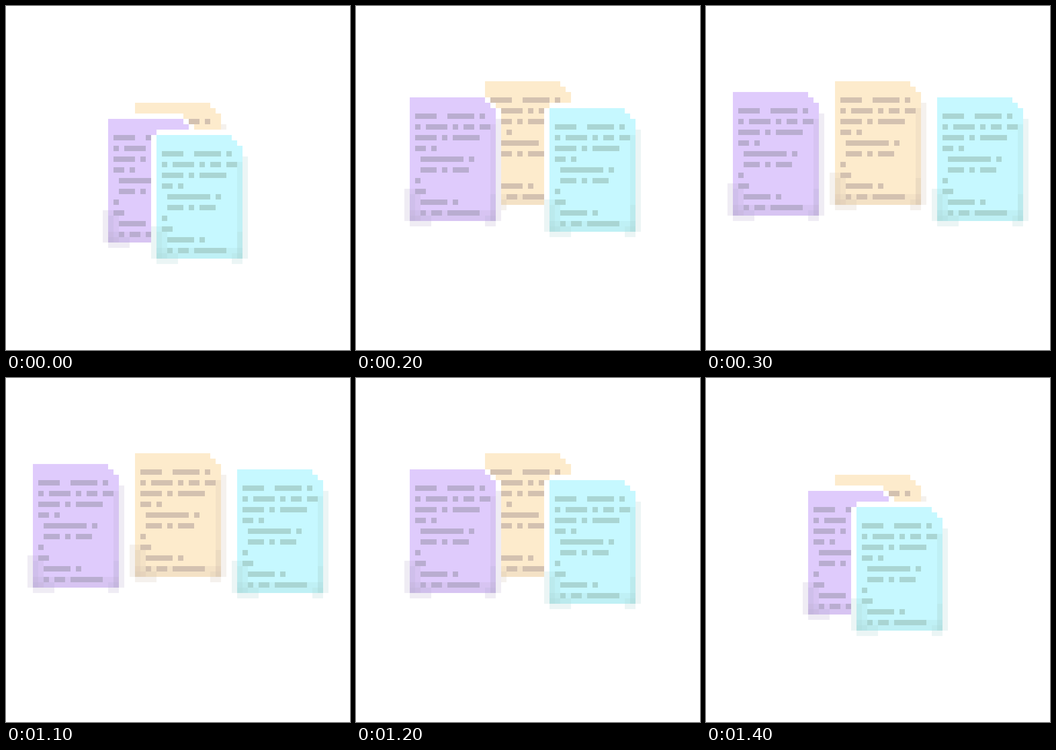
Animation of 640x640 px, one loop 1500 ms. Source, as an HTML page with a canvas:

```html
<!DOCTYPE html>
<html>
<head>
<meta charset="utf-8">
<style>
html, body { margin: 0; width: 100%; height: 100%; overflow: hidden; background: #fff; }
canvas { display: block; width: 640px; height: 640px; }
</style>
</head>
<body>
<canvas id="stage" width="640" height="640"></canvas>
<script>
const ctx = document.getElementById('stage').getContext('2d');
const CELL = 10, W = 16, H = 23;

// Every second row of a page, starting at row 3
const lines = [
  ' ####  ##### #',
  ' # #### # ## ##',
  ' #### # #####',
  ' ## #',
  '  ######## #',
  '  ### # ###',
  ' #',
  ' ##',
  '  ##### #',
  '  # ## ######'
];

// Back to front; x and y in cells at the key steps, from stacked to spread out
const keySteps = [0, 2, 3, 4];
const pages = [
  { paper: '#fdebcc', ink: '#d3c1b0', x: [24, 24, 24, 24], y: [18, 14, 14, 16] },
  { paper: '#dfcbfc', ink: '#b9add0', x: [19, 10, 5, 4], y: [21, 17, 16, 12] },
  { paper: '#c6f8ff', ink: '#a9d5d3', x: [28, 36, 43, 44], y: [24, 19, 17, 12] }
];

function between(values, step) {
  const next = Math.max(1, keySteps.findIndex(k => k >= step));
  const [from, to] = [keySteps[next - 1], keySteps[next]];
  const part = (step - from) / (to - from);
  return Math.round(values[next - 1] + (values[next] - values[next - 1]) * part);
}

function fill(color, x, y, w = 1, h = 1) {
  ctx.fillStyle = color;
  ctx.fillRect(x * CELL, y * CELL, w * CELL, h * CELL);
}

// Number of shadow layers over a cell on or around the page
function shadeDepth(x, y) {
  const across = x >= 0 && x < W, down = y < H;
  return [
    down && x < 2 && y >= 17 + Math.max(0, x),
    down && x >= W - 1 && y >= 20 - x,
    across && down && y >= H - 2,
    across && down && y >= 18 && (x === 0 || x === W - 1),
    across && y >= H - 1 && (x < 4 || x >= W - 2)
  ].filter(Boolean).length;
}

function drawPage({ paper, ink, x, y }, step) {
  ctx.save();
  ctx.translate(between(x, step) * CELL, between(y, step) * CELL);

  // Paper with a stepped corner and a white outline
  fill('#fff', 0, -1, W - 2);
  for (let row = 0; row < H; row++) {
    const width = W - 2 + Math.min(row, 2);
    fill('#fff', -1, row, width + 2);
    fill(paper, 0, row, width);
  }

  for (let row = 0; row <= H; row++) {
    for (let col = -1; col <= W; col++) {
      ctx.globalAlpha = 1 - 0.77 ** shadeDepth(col, row);
      fill(ink, col, row);
    }
  }

  ctx.globalAlpha = 1;
  lines.forEach((line, i) => {
    for (const dash of line.matchAll(/#+/g)) {
      fill(ink, dash.index, 3 + i * 2, dash[0].length);
    }
  });
  ctx.restore();
}

function draw() {
  const tick = Math.floor(performance.now() % 1500 / 100);
  const step = Math.min(tick, 4, 14 - tick);
  ctx.clearRect(0, 0, 640, 640);
  for (const page of pages) drawPage(page, step);
  requestAnimationFrame(draw);
}
draw();
</script>
</body>
</html>
```
